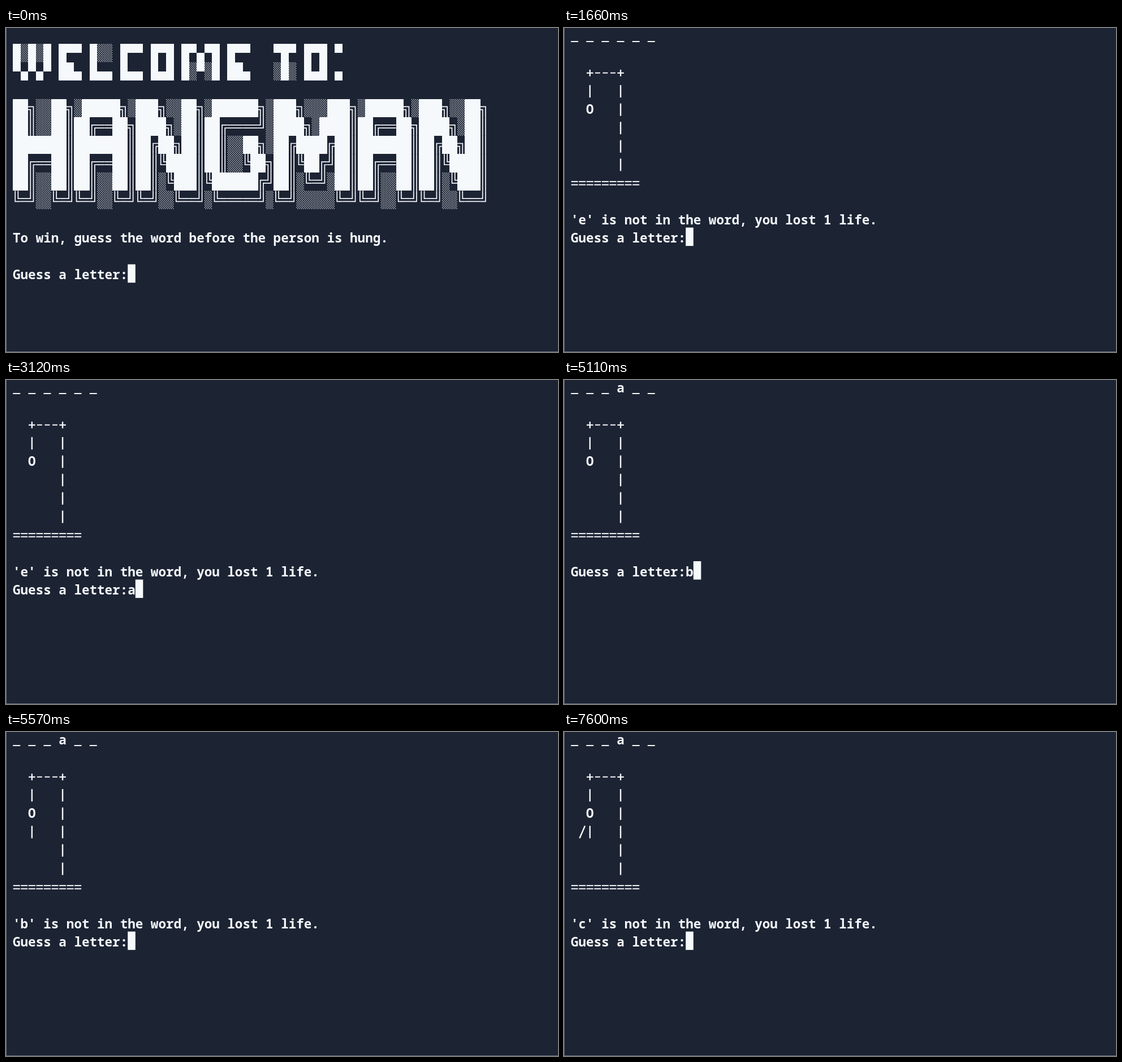
An HTML page with a canvas for the animation above (8000 ms loop, 976x574 px).

```html
<!DOCTYPE html>
<html lang="en">
<head>
<meta charset="utf-8">
<title>Hangman</title>
<style>
  html, body { margin: 0; width: 100%; height: 100%; overflow: hidden; background: #1c2333; }
  canvas { display: block; width: 976px; height: 574px; }
</style>
</head>
<body>
<canvas id="stage" width="976" height="574"></canvas>
<script>
const ctx = document.getElementById('stage').getContext('2d', { alpha: false });
const LOOP = 8000;
const BG = '#1c2333', FG = '#f5f9fc', EDGE = '#6f747e';
const CW = 13.55, LH = 32.55, LEFT = 12, TOP = -4.5;
const BASELINE = 26.5;
const PROMPT = 'Guess a letter:';

const TITLE = [
  '█░█░█ █▀▀ █░░ █▀▀ █▀█ █▀▄▀█ █▀▀   ▀█▀ █▀█ ▀',
  '▀▄▀▄▀ ██▄ █▄▄ █▄▄ █▄█ █░▀░█ ██▄   ░█░ █▄█ ▄',
  '',
  '██╗░░██╗░█████╗░███╗░░██╗░██████╗░███╗░░░███╗░█████╗░███╗░░██╗',
  '██║░░██║██╔══██╗████╗░██║██╔════╝░████╗░████║██╔══██╗████╗░██║',
  '███████║███████║██╔██╗██║██║░░██╗░██╔████╔██║███████║██╔██╗██║',
  '██╔══██║██╔══██║██║╚████║██║░░╚██╗██║╚██╔╝██║██╔══██║██║╚████║',
  '██║░░██║██║░░██║██║░╚███║╚██████╔╝██║░╚═╝░██║██║░░██║██║░╚███║',
  '╚═╝░░╚═╝╚═╝░░╚═╝╚═╝░░╚══╝░╚═════╝░╚═╝░░░░░╚═╝╚═╝░░╚═╝╚═╝░░╚══╝'
];

const intro = ['', ...TITLE, '', 'To win, guess the word before the person is hung.', ''];

const lost = c => `'${c}' is not in the word, you lost 1 life.`;

function board(word, body, message) {
  const lines = [
    word, '', '  +---+', '  |   |', '  O   |',
    body.padEnd(6) + '|', '      |', '      |', '=========', ''
  ];
  return message ? [...lines, message] : lines;
}

const BLANK = '_ _ _ _ _ _', FOUND = '_ _ _ a _ _';

// Each scene: start time, lines above the prompt, key typed and when
const scenes = [
  { at: 0, lines: intro, key: 'e', keyAt: 1000 },
  { at: 1660, lines: board(BLANK, '', lost('e')), key: 'a', keyAt: 3120 },
  { at: 3370, lines: board(FOUND, ''), key: 'b', keyAt: 5110 },
  { at: 5570, lines: board(FOUND, '  |', lost('b')), key: 'c', keyAt: 7380 },
  { at: 7600, lines: board(FOUND, ' /|', lost('c')), key: '', keyAt: LOOP }
];

// Rectangle with edges snapped to whole pixels, so neighbours join
function block(x, y, w, h) {
  const l = Math.round(x), t = Math.round(y);
  ctx.fillRect(l, t, Math.round(x + w) - l, Math.round(y + h) - t);
}

function shade(x, y) {
  const px = CW / 4, py = LH / 16;
  for (let r = 0; r < 16; r++)
    for (let c = 0; c < 4; c++)
      ctx.fillRect(x + (c + (r % 2) / 2) * px + 0.2, y + r * py + 0.3, 1.3, 1.3);
}

function path(...pts) {
  ctx.beginPath();
  pts.forEach(([x, y]) => ctx.lineTo(x, y));
  ctx.stroke();
}

const CORNERS = { '╔': [1, 1], '╗': [-1, 1], '╚': [1, -1], '╝': [-1, -1] };

function doubleLine(ch, x, y) {
  const cx = x + CW / 2, cy = y + LH / 2;
  ctx.lineWidth = 1.7;
  for (const d of [-2.6, 2.6]) {
    if (ch === '║') path([cx + d, y], [cx + d, y + LH]);
    else if (ch === '═') path([x, cy + d], [x + CW, cy + d]);
    else {
      const [h, v] = CORNERS[ch];
      const px = cx - h * d, py = cy - v * d;
      path([cx + h * CW / 2, py], [px, py], [px, cy + v * LH / 2]);
    }
  }
}

// Horizontal bar centred in its cell
const bar = (x, y, w, h = 2) => ctx.fillRect(x + (CW - w) / 2, y, w, h);

const glyphs = {
  '█': (x, y) => block(x, y, CW, LH),
  '▀': (x, y) => block(x, y, CW, LH / 2),
  '▄': (x, y) => block(x, y + LH / 2, CW, LH / 2),
  '░': shade,
  '_': (x, y) => bar(x, y + 27.5, 13),
  '-': (x, y) => bar(x, y + 18, 9),
  '+': (x, y) => { bar(x, y + 18, 11.6, 2.2); bar(x, y + 13.2, 2.3, 11.8); },
  '=': (x, y) => { bar(x, y + 15.2, 12); bar(x, y + 20.8, 12); },
  '|': (x, y) => bar(x, y + 8, 2.4, 22),
  '/': (x, y) => { ctx.lineWidth = 2.4; path([x + 2, y + 30], [x + CW - 2, y + 8]); }
};
for (const ch of '║═╔╗╚╝') glyphs[ch] = (x, y) => doubleLine(ch, x, y);

function drawLine(text, row) {
  const y = TOP + row * LH;
  let run = '', runX = LEFT;
  const flush = () => {
    if (run.trim()) ctx.fillText(run, runX, Math.round(y + BASELINE));
    run = '';
  };
  [...text].forEach((ch, i) => {
    const x = LEFT + i * CW;
    if (glyphs[ch]) {
      flush();
      glyphs[ch](x, y);
    } else {
      if (!run) runX = x;
      run += ch;
    }
  });
  flush();
}

function draw(t) {
  const scene = scenes.findLast(s => t >= s.at);
  const input = PROMPT + (t >= scene.keyAt ? scene.key : '');
  const row = scene.lines.length;

  ctx.fillStyle = BG;
  ctx.fillRect(0, 0, 976, 574);
  ctx.fillStyle = EDGE;
  ctx.fillRect(0, 0, 1, 574);
  ctx.fillRect(0, 573, 976, 1);

  ctx.fillStyle = ctx.strokeStyle = FG;
  ctx.font = '600 22.58px "Noto Sans Mono", "DejaVu Sans Mono", monospace';
  scene.lines.forEach(drawLine);
  drawLine(input, row);
  ctx.fillRect(LEFT + input.length * CW, TOP + row * LH, CW, LH);
}

const start = performance.now();
function tick() {
  draw((performance.now() - start) % LOOP);
  requestAnimationFrame(tick);
}
tick();
</script>
</body>
</html>
```
